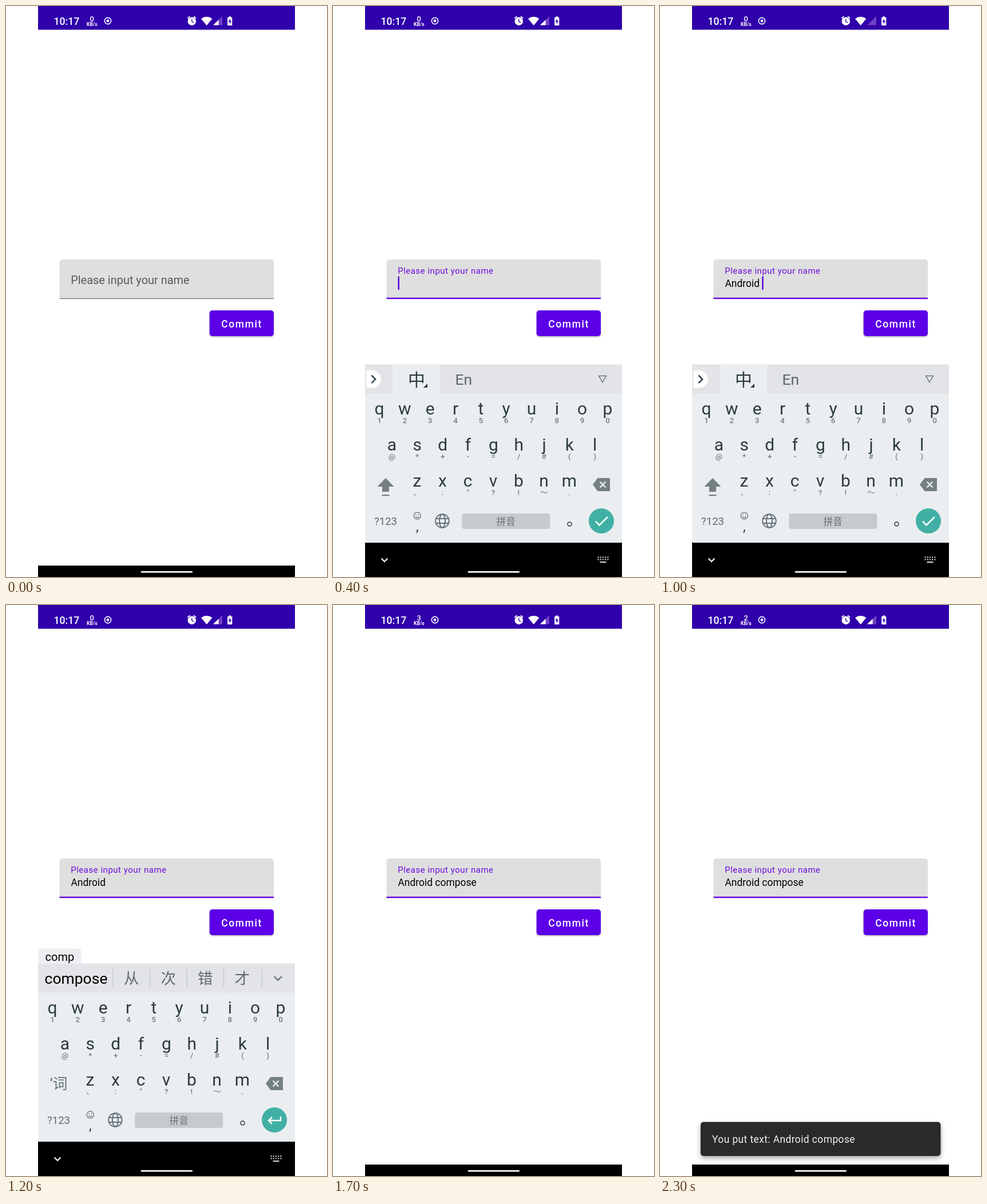
An HTML page that plays this animation: 561x998 px, repeating every 2400 ms.

```html
<!DOCTYPE html>
<html lang="en">
<head>
<meta charset="utf-8">
<title>Text field demo</title>
<style>
  html, body { margin: 0; width: 100%; height: 100%; overflow: hidden; background: #fff; }
  svg { display: block; width: 561px; height: 998px; }
  text { font-family: Roboto, "Noto Sans CJK SC", "Noto Sans CJK", sans-serif; white-space: pre; }
  .mid { text-anchor: middle; }
  .line { fill: none; stroke-width: 2; }
  .key { font-size: 30px; fill: #2b3a40; }
  .hint { font-size: 13.5px; font-weight: 500; fill: #717c81; }
  .body { font-size: 17.46px; }
  .grey { fill: #758085; }
</style>
</head>
<body>
<svg viewBox="0 0 561 998">
  <defs>
    <filter id="shadow" x="-20%" y="-30%" width="140%" height="170%">
      <feDropShadow dx="0" dy="1.5" stdDeviation="1.3" flood-opacity=".3"/>
    </filter>
    <filter id="deep" x="-20%" y="-50%" width="140%" height="220%">
      <feDropShadow dx="0" dy="4" stdDeviation="4" flood-opacity=".35"/>
    </filter>
  </defs>

  <!-- status bar -->
  <rect x="56" width="449" height="41.5" fill="#3000ab"/>
  <g fill="#fff">
    <text x="83.5" y="32.5" font-size="17.7" font-weight="500">10:17</text>
    <text id="speed" class="mid" x="150.3" y="27" font-size="13" font-weight="500"></text>
    <text class="mid" x="150.3" y="35" font-size="8.6" font-weight="700">KB/s</text>
    <circle cx="178" cy="26" r="5.6" fill="none" stroke="#fff" stroke-width="1.6"/>
    <circle cx="178" cy="26" r="2.4"/>
    <circle cx="324.8" cy="26.7" r="7.2"/>
    <path d="M317.5 21.5l4-3.4M332 21.5l-4-3.4" stroke="#fff" stroke-width="1.8"/>
    <path class="line" d="M324.8 22.5v4.6l3.4 2.2" stroke="#3000ab" style="stroke-width:1.3"/>
    <path d="M341 22.2Q350.7 15.4 360.4 22.2L350.7 34Z"/>
    <path d="M362 33.5L378 18V33.5Z" fill="#7040c6"/>
    <path id="signal" d="M362 33.5L371.6 24.2V33.5Z"/>
    <path d="M389.5 18.2h3.4v1.8h2.4v14h-8.2v-14h2.4Z"/>
    <path d="M391.8 22l-3.2 5.6h2.2v4.2l3.2-5.8h-2.2Z" fill="#3000ab"/>
  </g>

  <!-- form -->
  <path d="M93.5 512V448a5 5 0 0 1 5-5H463a5 5 0 0 1 5 5V512Z" fill="#dfdfdf"/>
  <g id="resting">
    <rect x="93.5" y="510.8" width="374.5" height="1.3" fill="#777"/>
    <text x="113.2" y="485.5" font-size="19.96" fill="#5a5a5a">Please input your name</text>
  </g>
  <g id="focused">
    <rect x="93.5" y="509.7" width="374.5" height="2.5" fill="#6408e0"/>
    <text x="113.2" y="467.6" font-size="14.97" letter-spacing=".53" fill="#6c0cd8">Please input your name</text>
    <text id="value" class="body" x="113.4" y="491.3"></text>
    <rect id="cursor" y="472.5" width="2.5" height="23.5" fill="#5f08d8"/>
  </g>
  <rect x="355.7" y="532" width="112.3" height="45" rx="5" fill="#5b00e8" filter="url(#shadow)"/>
  <text x="376.2" y="561.8" class="body" font-weight="500" letter-spacing="1.65" fill="#fff">Commit</text>

  <!-- navigation bar -->
  <rect id="nav" x="56" width="449" fill="#000"/>

  <g id="keyboard">
    <rect x="56" y="625.5" width="449" height="2" fill="#f3f4f5"/>
    <rect x="56" y="627" width="449" height="311" fill="#eaeef1"/>
    <rect x="56" y="627" width="449" height="50.5" fill="#e2e4e7"/>

    <g id="tabs">
      <rect x="104" y="627" width="83" height="51" fill="#eaeef1"/>
      <path d="M58.5 637H68.5a15.3 15.3 0 0 1 0 30.6H58.5Z" fill="#fff"/>
      <path class="line" d="M67.5 645.5l6.5 6.8l-6.5 6.8" stroke="#37474f" style="stroke-width:2.6"/>
      <text class="mid" x="146" y="663.7" font-size="30" font-weight="300" fill="#2b3a40">中</text>
      <path d="M165 660v7h-7Z" fill="#2b3a40"/>
      <text x="213.5" y="661.5" font-size="26.5" fill="#5f6a70">En</text>
      <path class="line" d="M464.5 646.5h13l-6.5 11Z" stroke="#66727a" style="stroke-width:1.4"/>
      <path class="grey" d="M92 825l14.5 15H98v9H86v-9H77.5Z"/>
      <rect class="grey" x="85.5" y="854" width="13" height="2.4"/>
    </g>

    <g id="composer">
      <path id="bubble" fill="#eceef1"/>
      <text id="pinyin" x="68.5" y="621.5" font-size="20"></text>
      <g id="candidates"></g>
      <path class="line" d="M468.5 649l6.7 6.7l6.7-6.7" stroke="#6b777d" style="stroke-width:2.4"/>
      <text class="mid" x="92" y="846" font-size="26" fill="#66727a">‘词</text>
    </g>

    <g id="keys"></g>
    <path class="grey" d="M454 836.5l8.5-11.5H484V848H462.5Z"/>
    <path class="line" d="M466.5 831.5l10 10m0-10l-10 10" stroke="#eaeef1" style="stroke-width:2.4"/>

    <text class="mid" x="92" y="907" font-size="18.6" fill="#5f6a70">?123</text>
    <g class="line" stroke="#66727a" style="stroke-width:1.3">
      <circle cx="147.3" cy="891" r="6.2"/>
      <path d="M144 892.5q3.3 4 6.6 0M145 888v2m4.6-2v2"/>
    </g>
    <text class="mid key" x="147.3" y="918" style="font-size:24px">,</text>
    <g class="line" stroke="#66727a">
      <circle cx="191" cy="900" r="11.8"/>
      <ellipse cx="191" cy="900" rx="5" ry="11.8"/>
      <path d="M180 896h22m-22 8h22"/>
    </g>
    <rect x="225.3" y="887" width="154" height="27" rx="4" fill="#c6cacd"/>
    <text class="mid" x="302.3" y="907" font-size="16.5" fill="#66727a">拼音</text>
    <circle class="line" cx="413.5" cy="905.5" r="3.5" stroke="#2b3a40" style="stroke-width:1.5"/>
    <circle cx="469" cy="900" r="22" fill="#41b0a4"/>
    <path id="check" class="line" d="M459 900.5l6.5 7l14.5-14.5" stroke="#fff" style="stroke-width:2.5"/>
    <path id="enter" class="line" d="M480 894v7H459m6-6l-6 6l6 6" stroke="#fff" style="stroke-width:2.5"/>

    <path class="line" d="M84.5 965.5l5.5 5.5l5.5-5.5" stroke="#fff"/>
    <path class="line" d="M462.5 963.5h19m-19 4h19" stroke="#ddd" stroke-dasharray="2.2 2" style="stroke-width:2.2"/>
    <path class="line" d="M466.5 972h11" stroke="#ddd"/>

    <g id="popup">
      <rect x="-24" y="-45" width="48" height="140" rx="4" fill="#d8dadc" filter="url(#shadow)"/>
      <text class="mid key" y="2.5" style="font-size:35px"></text>
      <path d="M7.5 17h11" stroke="#2b3a40" stroke-width="2" stroke-dasharray="2 2.5"/>
    </g>
  </g>
  <rect x="235.7" y="987.8" width="90.3" height="2.7" rx="1.3" fill="#fff"/>

  <g id="snackbar">
    <rect x="71" y="903.5" width="419.5" height="59.5" rx="5" fill="#2c2c2c" filter="url(#deep)"/>
    <text x="91" y="940" class="body" letter-spacing=".4" fill="#f2f2f2">You put text: Android compose</text>
  </g>
</svg>

<script>
const $ = id => document.getElementById(id);
const show = (id, on) => $(id).style.display = on ? '' : 'none';
const label = (x, y, cls, text) => `<text class="mid ${cls}" x="${x}" y="${y}">${text}</text>`;

const STEP = 44.33;
const rows = [
  { x: 81, y: 714.3, keys: 'qwertyuiop', hints: '1234567890' },
  { x: 103, y: 777.3, keys: 'asdfghjkl', hints: '@*+-=/#()' },
  { x: 147, y: 840.3, keys: 'zxcvbnm', hints: '、:"?!～.' },
];
const keyPos = {};
for (const { x, y, keys, hints } of rows) {
  [...keys].forEach((key, i) => {
    const kx = x + i * STEP;
    keyPos[key] = [kx, y];
    $('keys').innerHTML += label(kx, y, 'key', key) + label(kx, y + 14.7, 'hint', hints[i]);
  });
}

// Long candidates take two slots.
function candidateBar(words) {
  const slot = 64.5;
  let x = 58, out = '';
  words.forEach((word, i) => {
    const width = word.length > 1 ? 2 * slot : slot;
    out += `<text class="mid" x="${x + width / 2}" y="662.3" font-size="26.5" fill="${i ? '#5f6a70' : '#000'}">${word}</text>`;
    x += width;
    const line = x > 440 ? 447 : x;
    out += `<path d="M${line} 636v32" stroke="#c3c7ca" stroke-width="1.3"/>`;
  });
  return out;
}

const AN = [...'安按俺案暗岸'];
const ANDROID = ['Android', ...'安按俺案'];
const CO = [...'从次错才草存'];
const COMPOSE = ['compose', ...'从次错才'];

// The network meter refreshes at a fixed interval.
const speeds = [0, 0, 20, 0, 4, 3, 2];
const speedAt = time => speeds[Math.floor((time + 300) / 400)];

// Each entry changes part of the state at its time in ms.
const timeline = [
  [0, { signal: true, keyboard: false, focus: false, value: '', pinyin: '', words: [], press: '', cursor: 0, snackbar: false }],
  [300, { keyboard: true, focus: true, cursor: 113.5 }],
  [500, { pinyin: 'a', words: AN, cursor: 0 }],
  [600, { pinyin: 'an', press: 'd' }],
  [700, { pinyin: 'andro', words: ANDROID, press: '' }],
  [800, { pinyin: 'android' }],
  [900, { pinyin: '', value: 'Android ', cursor: 178.3, signal: false }],
  [1100, { pinyin: 'co', words: CO, cursor: 0, signal: true }],
  [1200, { pinyin: 'comp', words: COMPOSE }],
  [1300, { pinyin: 'compos' }],
  [1400, { pinyin: 'compose' }],
  [1500, { pinyin: '', value: 'Android compose', cursor: 248.7 }],
  [1700, { keyboard: false, cursor: 0 }],
  [1900, { snackbar: true }],
];

function draw(s) {
  show('signal', s.signal);
  show('resting', !s.focus);
  show('focused', s.focus);
  $('value').textContent = s.value;
  show('cursor', s.cursor);
  $('cursor').setAttribute('x', s.cursor);
  const navTop = s.keyboard ? 938 : 978;
  $('nav').setAttribute('y', navTop);
  $('nav').setAttribute('height', 998 - navTop);
  show('keyboard', s.keyboard);
  show('tabs', !s.pinyin);
  show('check', !s.pinyin);
  show('composer', s.pinyin);
  show('enter', s.pinyin);
  if (s.pinyin) {
    $('pinyin').textContent = s.pinyin;
    const width = $('pinyin').getComputedTextLength() + 19;
    $('bubble').setAttribute('d', `M56 600.5h${width}a6 6 0 0 1 6 6v21H56Z`);
    $('candidates').innerHTML = candidateBar(s.words);
  }
  show('popup', s.press);
  if (s.press) {
    const [x, y] = keyPos[s.press];
    $('popup').setAttribute('transform', `translate(${x} ${y - 73})`);
    $('popup').querySelector('text').textContent = s.press;
  }
  show('snackbar', s.snackbar);
}

let drawn = -1;
function tick() {
  const time = performance.now() % 2400;
  $('speed').textContent = speedAt(time);
  const past = timeline.filter(([start]) => start <= time);
  if (past.length !== drawn) {
    drawn = past.length;
    draw(Object.assign({}, ...past.map(([, change]) => change)));
  }
  requestAnimationFrame(tick);
}
tick();
</script>
</body>
</html>
```
